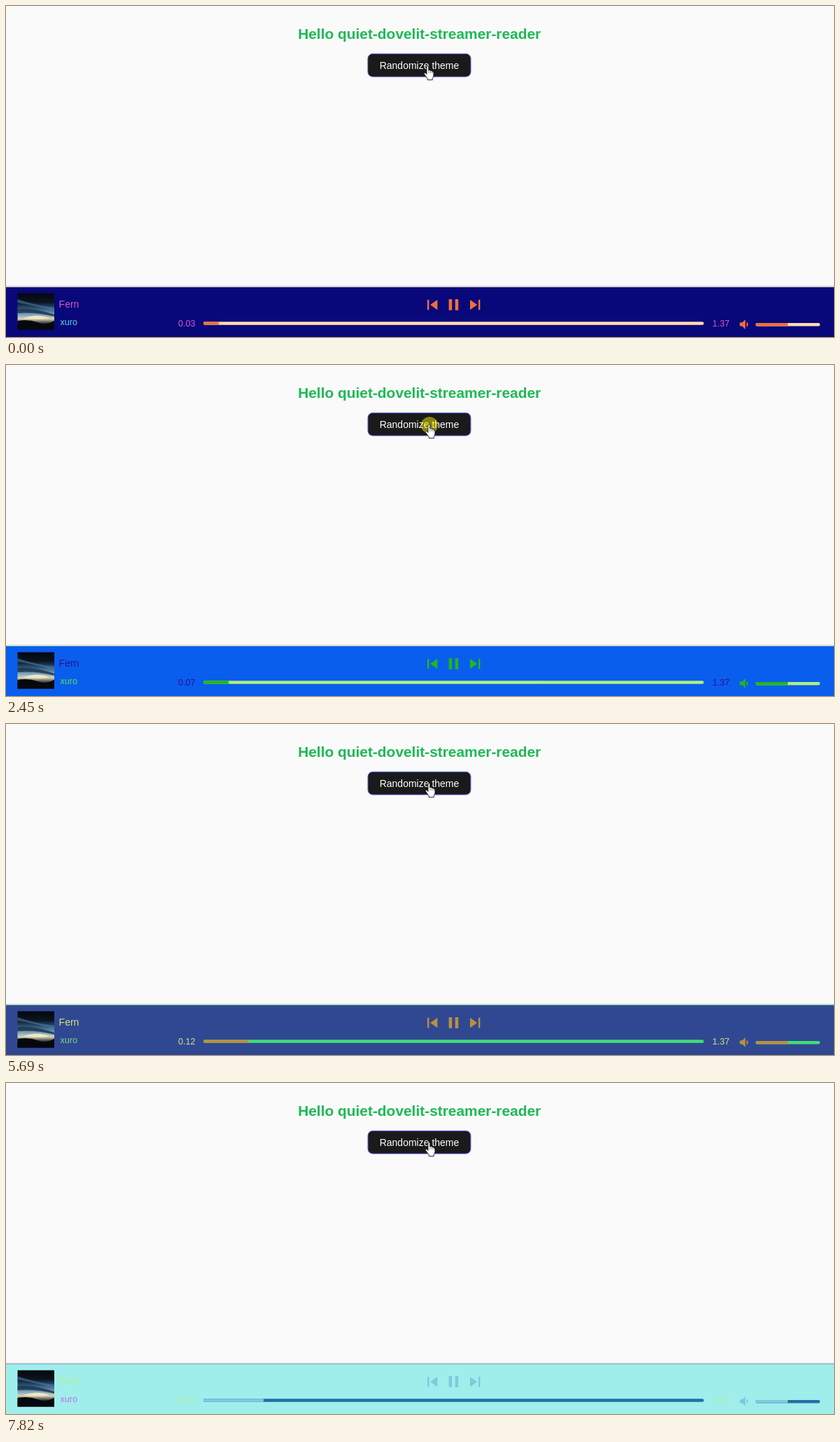
An HTML page that plays this animation: 1183x473 px, repeating every 8 s.

```html
<!DOCTYPE html>
<html lang="en">
<head>
<meta charset="utf-8">
<title>Playback bar themes</title>
<style>
  html, body { margin: 0; width: 100%; height: 100%; overflow: hidden; background: #fafafa; }
  svg { display: block; width: 1183px; height: 473px; font-family: "Liberation Sans", Arial, sans-serif; }
  #bar { fill: var(--bg); }
  .fill { fill: var(--fill); }
  .track { fill: var(--track); }
  .title { fill: var(--title); }
  .artist { fill: var(--artist); }
  .small { font-size: 12.6px; }
</style>
</head>
<body>
<svg id="stage" viewBox="0 0 1183 473">
  <defs>
    <linearGradient id="sky" x1="0" y1="0" x2="0" y2="1">
      <stop offset="0" stop-color="#04070c"/>
      <stop offset=".25" stop-color="#0a1420"/>
      <stop offset=".42" stop-color="#2f5578"/>
      <stop offset=".6" stop-color="#86a9c2"/>
      <stop offset=".7" stop-color="#d8d3b4"/>
      <stop offset=".8" stop-color="#4a4a48"/>
      <stop offset=".88" stop-color="#06080c"/>
    </linearGradient>
    <filter id="soft" x="-5%" y="-200%" width="110%" height="500%"><feGaussianBlur stdDeviation="0 .8"/></filter>
    <clipPath id="cover"><rect x="16.5" y="410.5" width="52.5" height="52"/></clipPath>
    <clipPath id="seekClip"><rect x="282" y="451.2" width="715" height="4.6" rx="2.3"/></clipPath>
    <clipPath id="volClip"><rect x="1071" y="453" width="92" height="4.6" rx="2.3"/></clipPath>
  </defs>

  <rect width="1183" height="473" fill="#fafafa"/>
  <text x="590.7" y="47" text-anchor="middle" font-size="20.9" font-weight="700" fill="#1db954">Hello quiet-dovelit-streamer-reader</text>

  <rect id="button" x="517" y="68.3" width="147" height="32.8" rx="7" fill="#1a1a1a"/>
  <text x="590.5" y="90" text-anchor="middle" font-size="14" fill="#fff">Randomize theme</text>

  <circle id="press" cx="605" cy="86" r="12" fill="#ff0" fill-opacity=".47"/>
  <g id="hand">
    <path d="M4 11V2.2Q4 .6 5.4.6T6.8 2.2V7Q9 6 9.6 7.6Q11.5 7 12 8.6Q14 8.2 14 10.4V14Q14 16.5 12.3 18.2V20.6H5.2V18.5Q2.6 15.6.8 12.6Q0 11 1.2 10.4T4 12.5Z"
      fill="#fff" stroke="#111" stroke-width=".9" stroke-linejoin="round"/>
    <path d="M7 7.5V11M9.6 8V11M12 9V11.5" stroke="#333" stroke-width=".6"/>
  </g>

  <rect y="400.6" width="1183" height="2" fill="#777" opacity=".45" filter="url(#soft)"/>
  <rect class="track" y="401" width="1183" height="1" opacity=".6"/>
  <rect id="bar" y="401.8" width="1183" height="72"/>

  <g clip-path="url(#cover)">
    <rect x="16" y="410" width="54" height="53" fill="url(#sky)"/>
    <path d="M16 424Q36 426 70 437V431Q46 429 16 419Z" fill="#4a7ba4" opacity=".6"/>
    <path d="M16 433Q40 431 70 441V444Q42 437 16 439Z" fill="#18304a" opacity=".8"/>
    <path d="M24 446Q46 439 62 446Q44 449 24 446Z" fill="#efe6c2"/>
    <path d="M16 450Q32 447 45 452T70 449V463H16Z" fill="#06080d"/>
  </g>
  <text class="title" x="75.6" y="431" font-size="14">Fern</text>
  <text class="artist small" x="77.5" y="455.6">xuro</text>

  <g class="fill">
    <path transform="translate(594.8 412.6) scale(1.2)" d="M6 6h2v12H6zM9.5 12l8.5 6V6z"/>
    <path transform="translate(625.9 413.4) scale(1.13)" d="M6 5h4v14H6zM14 5h4v14h-4z"/>
    <path transform="translate(655.8 412.6) scale(1.2)" d="M6 18l8.5-6L6 6zM16 6h2v12h-2z"/>
    <path transform="translate(1044 444.4) scale(.88)" d="M18.5 12c0-1.77-1.02-3.29-2.5-4.03v8.05c1.48-.73 2.5-2.25 2.5-4.02zM5 9v6h4l5 5V4L9 9z"/>
  </g>

  <text id="clock" class="title small" x="246" y="458"></text>
  <text class="title small" x="1009.2" y="458">1.37</text>
  <g clip-path="url(#seekClip)">
    <rect class="track" x="282" y="451" width="715" height="5"/>
    <rect id="seek" class="fill" x="282" y="451" height="5"/>
  </g>
  <g clip-path="url(#volClip)">
    <rect class="track" x="1071" y="452" width="92" height="6"/>
    <rect class="fill" x="1071" y="452" width="46" height="6"/>
  </g>
</svg>

<script>
const LOOP = 8000;
const KEYS = ["bg", "fill", "track", "title", "artist"];

// Start time, then one colour per key
const themes = [
  [0, "#08087a", "#f0703c", "#ffdcb0", "#d058c8", "#58d8e8"],
  [600, "#3a54a8", "#d8a860", "#a8d8c0", "#e8d8f0", "#90d0f0"],
  [1520, "#0a5eee", "#22b818", "#b0f080", "#2a1090", "#60e050"],
  [2520, "#8450d8", "#9070f0", "#f08070", "#ffe8b0", "#e08888"],
  [3640, "#6c6cc4", "#ecd0fc", "#9040ec", "#c0e878", "#80b8e8"],
  [4700, "#304892", "#b89040", "#40e074", "#d8e080", "#78d890"],
  [5760, "#10187f", "#4890a8", "#90b828", "#a0f080", "#5868b8"],
  [6620, "#5888b8", "#a8d8d0", "#4868a0", "#d8f0b0", "#d8b0e8"],
  [7480, "#a0eeec", "#80c8dc", "#2070a8", "#b0f090", "#c070e0"]
];
const presses = [[530, 600], [1330, 1460], [2390, 2460], [3450, 3580],
  [4510, 4640], [5630, 5690], [6490, 6560], [7290, 7420]];
const ticks = [270, 930, 1520, 2180, 2790, 3380, 4040, 4700, 5300, 5890, 6490, 7150, 7820];
const seeks = [930, 1850, 2790, 3380, 4310, 5300, 6220, 7150, 7820];

const el = id => document.getElementById(id);
const stage = el("stage"), hand = el("hand"), button = el("button"),
  press = el("press"), clock = el("clock"), seek = el("seek");
const passed = (times, t) => times.filter(s => s <= t).length;

function draw(t) {
  const theme = themes[passed(themes.map(row => row[0]), t) - 1];
  KEYS.forEach((key, i) => stage.style.setProperty("--" + key, theme[i + 1]));

  clock.textContent = "0." + String(3 + passed(ticks, t)).padStart(2, "0");
  seek.setAttribute("width", 22 + 7.11 * passed(seeks, t));

  press.style.display = presses.some(([from, to]) => t >= from && t < to) ? "" : "none";
  const [x, y] = [[597, 85], [598, 84.5], [599, 84]][passed([70, 130], t)];
  hand.setAttribute("transform", `translate(${x} ${y})`);
  button.setAttribute("stroke", t < 70 ? "#5055cc" : "#646cff");
}

const start = performance.now();
function frame() {
  draw((performance.now() - start) % LOOP);
  requestAnimationFrame(frame);
}
frame();
</script>
</body>
</html>
```
